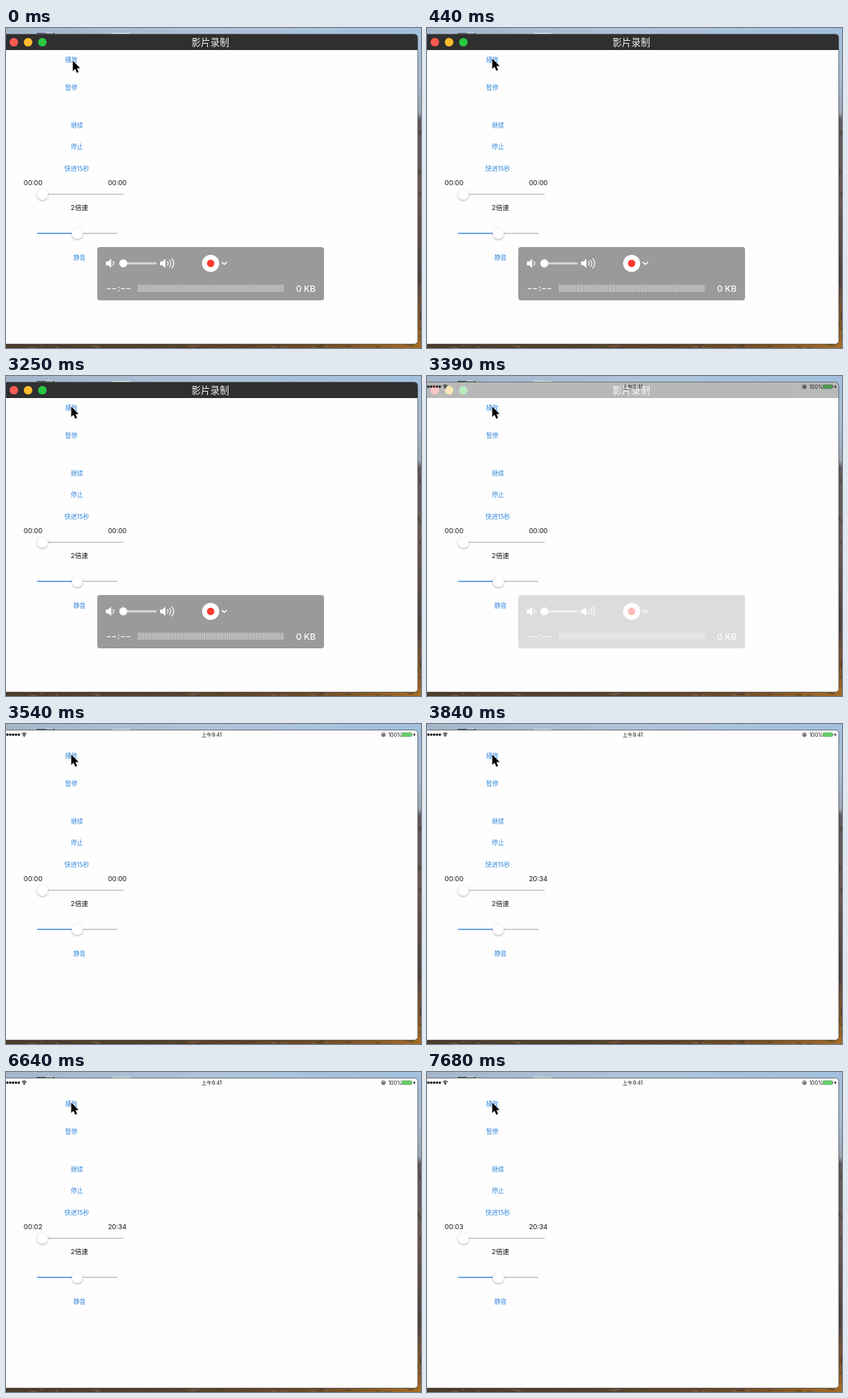
Write an HTML page that moves like this. It is 582x450 px and loops after 8000 ms.

```html
<!DOCTYPE html>
<html lang="zh-CN">
<head>
<meta charset="utf-8">
<title>影片录制</title>
<style>
  html, body { margin: 0; width: 100%; height: 100%; overflow: hidden; }
  svg { display: block; width: 582px; height: 450px; }
  text { font-family: Inter, "Noto Sans CJK SC", "Noto Sans CJK", sans-serif; white-space: pre; }
  .mid { text-anchor: middle; }
  .link { font-size: 8.6px; fill: #2f87dd; text-anchor: middle; }
  .label { font-size: 9.4px; fill: #111; }
  .status { font-size: 7.2px; fill: #111; }
  .line { fill: none; stroke: #fff; stroke-linecap: round; stroke-linejoin: round; }
</style>
</head>
<body>
<svg viewBox="0 0 582 450" xmlns="http://www.w3.org/2000/svg">
  <defs>
    <linearGradient id="sky" x2="1" y2="0">
      <stop offset="0" stop-color="#a5b6c9"/>
      <stop offset=".5" stop-color="#aec3d8"/>
      <stop offset="1" stop-color="#a3c0df"/>
    </linearGradient>
    <linearGradient id="side" x2="0" y2="1">
      <stop offset="0" stop-color="#a3c0df"/>
      <stop offset=".15" stop-color="#a9bccf"/>
      <stop offset=".265" stop-color="#9aa5b2"/>
      <stop offset=".285" stop-color="#5e5a60"/>
      <stop offset=".5" stop-color="#6d5a55"/>
      <stop offset=".78" stop-color="#4f4140"/>
      <stop offset=".9" stop-color="#84592e"/>
      <stop offset="1" stop-color="#a66a22"/>
    </linearGradient>
    <linearGradient id="ground" x2="1" y2="0">
      <stop offset="0" stop-color="#4b3b2b"/>
      <stop offset=".45" stop-color="#574029"/>
      <stop offset=".75" stop-color="#6d4a26"/>
      <stop offset="1" stop-color="#a46c25"/>
    </linearGradient>
    <filter id="soft" x="-50%" y="-50%" width="200%" height="200%">
      <feDropShadow dx="0" dy="1.2" stdDeviation="1" flood-opacity=".3"/>
    </filter>
  </defs>

  <rect width="582" height="450" fill="url(#sky)"/>
  <rect x="570" width="12" height="450" fill="url(#side)"/>
  <rect y="440" width="582" height="10" fill="url(#ground)"/>
  <g id="rocks"></g>
  <path d="M43 8H68" stroke="#3d4650" stroke-width="2"/>
  <path d="M56 7H66" stroke="#e6eaee"/>
  <path d="M149 8H174" stroke="#e9edf1" stroke-width="2"/>

  <rect x="-10" y="8.5" width="587.5" height="436" rx="5" fill="#fefefe" stroke="#3c4249" stroke-opacity=".7"/>

  <g id="status">
    <g id="signal" fill="#111"></g>
    <g fill="none" stroke="#111" stroke-width="1.1">
      <path d="M22.3 14.2Q25.5 11 28.7 14.2M23.7 15.8Q25.5 14 27.3 15.8"/>
      <circle cx="529.3" cy="15.1" r="2.6" stroke-width=".8"/>
    </g>
    <circle cx="25.5" cy="17" r=".9" fill="#111"/>
    <rect x="528.1" y="14.4" width="2.4" height="1.9" fill="#111"/>
    <text class="status mid" x="288.5" y="17.6">上午9:41</text>
    <text class="status" x="536.2" y="17.6">100%</text>
    <rect x="555.2" y="12.2" width="13.4" height="5.6" rx="1" fill="#62cf65" stroke="#5d8d60" stroke-width=".6"/>
    <path d="M569.6 13.8V16.2" stroke="#5d8d60"/>
    <path d="M573.2 12.3L570.9 15.5H572.5L572 17.8L574.4 14.6H572.8Z" fill="#111"/>
  </g>

  <g id="links"></g>
  <text id="now" class="label" x="24.8" y="220.6">00:00</text>
  <text id="total" class="label" x="142.9" y="220.6">00:00</text>
  <text class="label mid" x="103" y="256">2倍速</text>
  <g id="sliders"></g>

  <g id="overlay">
    <path d="M0 9H573Q577 9 577 13V31H0Z" fill="#2f2f2f"/>
    <circle cx="11" cy="20" r="6" fill="#ff5a52"/>
    <circle cx="31" cy="20" r="6" fill="#fdbc2e"/>
    <circle cx="51" cy="20" r="6" fill="#29c941"/>
    <text class="mid" x="286.5" y="25" font-size="13.2" fill="#f2f2f2">影片录制</text>

    <rect x="128" y="308" width="318" height="75" rx="4" fill="#9a9a9b"/>
    <path id="speaker" d="M140 328.5H143L147.5 324.5V337.5L143 333.5H140Z" fill="#fff"/>
    <path class="line" d="M150 328.5Q152.4 331 150 333.5" stroke-width="1.2"/>
    <path d="M165 331H210" stroke="#d6d6d6" stroke-width="3" stroke-linecap="round"/>
    <circle cx="164.5" cy="331" r="5.7" fill="#fff"/>
    <use href="#speaker" x="76"/>
    <path class="line" d="M226.3 328.5Q228.6 331 226.3 333.5M229.3 326.4Q233.2 331 229.3 335.6M232.5 324.3Q238.2 331 232.5 337.7" stroke-width="1.2"/>
    <circle cx="287" cy="331" r="12" fill="#fff"/>
    <circle cx="287" cy="331" r="5.2" fill="#ff3b30"/>
    <path class="line" d="M302.8 329.5L306.2 332.4L309.6 329.5" stroke-width="1.6"/>
    <text x="141" y="370" font-size="11" font-weight="700" fill="#fff" letter-spacing="1.4" style="font-family:'Liberation Sans',sans-serif">––:––</text>
    <path d="M185 366H390" stroke="#c9c9c9" stroke-width="10" stroke-dasharray="1.5 1"/>
    <text class="mid" x="420.5" y="371" font-size="12.2" font-weight="500" fill="#fff">0 KB</text>
  </g>

  <path id="cursor" d="M0 0V14.5L3.3 11.5L5.6 17L8.2 15.9L5.9 10.6H10.4Z" fill="#000" stroke="#fff" stroke-width="1" stroke-linejoin="round" paint-order="stroke"/>
</svg>

<script>
const LOOP = 8000;
const $ = id => document.getElementById(id);

function add(parent, tag, attrs, text) {
  const el = document.createElementNS("http://www.w3.org/2000/svg", tag);
  for (const key in attrs) el.setAttribute(key, attrs[key]);
  if (text) el.textContent = text;
  parent.append(el);
  return el;
}

function buildLinks() {
  const links = [
    ["播放", 91.5, 45], ["暂停", 91.5, 83.5], ["继续", 99.5, 136.5],
    ["停止", 99.5, 167], ["快进15秒", 99.3, 198], ["静音", 103, 322.5]
  ];
  return links.map(([text, x, y]) =>
    add($("links"), "text", { class: "link", x, y: y + 3.2 }, text));
}

function buildSlider(from, to, knob, y) {
  const track = (a, b, stroke) =>
    add($("sliders"), "path", { d: `M${a} ${y}H${b}`, stroke, "stroke-width": 1.5 });
  track(from, knob, "#3f88e2");
  track(knob, to, "#bfbfbf");
  add($("sliders"), "circle", {
    cx: knob, cy: y, r: 7.8, fill: "#fff", stroke: "#ddd", "stroke-width": .4, filter: "url(#soft)"
  });
}

// Rough rock texture along the visible desktop edges
function buildRocks() {
  let seed = 7;
  const rnd = () => (seed = seed * 16807 % 2147483647) / 2147483647;
  const tones = ["#2e2728", "#8b6b56", "#6b4a2c", "#3e332e"];
  for (let i = 0; i < 60; i++) {
    const low = i % 2;
    const x = low ? rnd() * 582 : 576 + rnd() * 5;
    const y = low ? 445 + rnd() * 4 : 128 + rnd() * 310;
    const w = low ? 5 + rnd() * 14 : 2 + rnd() * 3;
    const h = low ? 1 + rnd() * 2 : 3 + rnd() * 9;
    add($("rocks"), "path", {
      d: `M${x} ${y}l${w} ${h / 3}l${-w / 3} ${h}z`,
      fill: tones[i % 4], opacity: .5
    });
  }
}

// Value of the last step that has started by time t
const step = (t, steps) => steps.filter(s => s[0] <= t).pop()[1];

const play = buildLinks()[0];
buildSlider(51, 165, 51, 233.8);
buildSlider(43.5, 156, 100, 288.8);
buildRocks();
for (let i = 0; i < 5; i++) add($("signal"), "circle", { cx: 2 + i * 4, cy: 15, r: 1.75 });

function draw(t) {
  const [x, y] = step(t, [[0, [93.7, 46]], [300, [92, 44.2]], [440, [91.5, 43]]]);
  $("cursor").setAttribute("transform", `translate(${x} ${y})`);
  play.setAttribute("opacity", step(t, [[0, 1], [2800, .25], [3100, .6], [3250, 1]]));
  $("overlay").setAttribute("opacity", step(t, [[0, 1], [3390, .335], [3540, 0]]));
  $("now").textContent = "00:0" + step(t, [[0, 0], [5750, 1], [6640, 2], [7680, 3]]);
  $("total").textContent = step(t, [[0, "00:00"], [3690, "20:34"]]);
}

let start;
function tick(now) {
  start ??= now;
  draw((now - start) % LOOP);
  requestAnimationFrame(tick);
}
draw(0);
requestAnimationFrame(tick);
</script>
</body>
</html>
```
